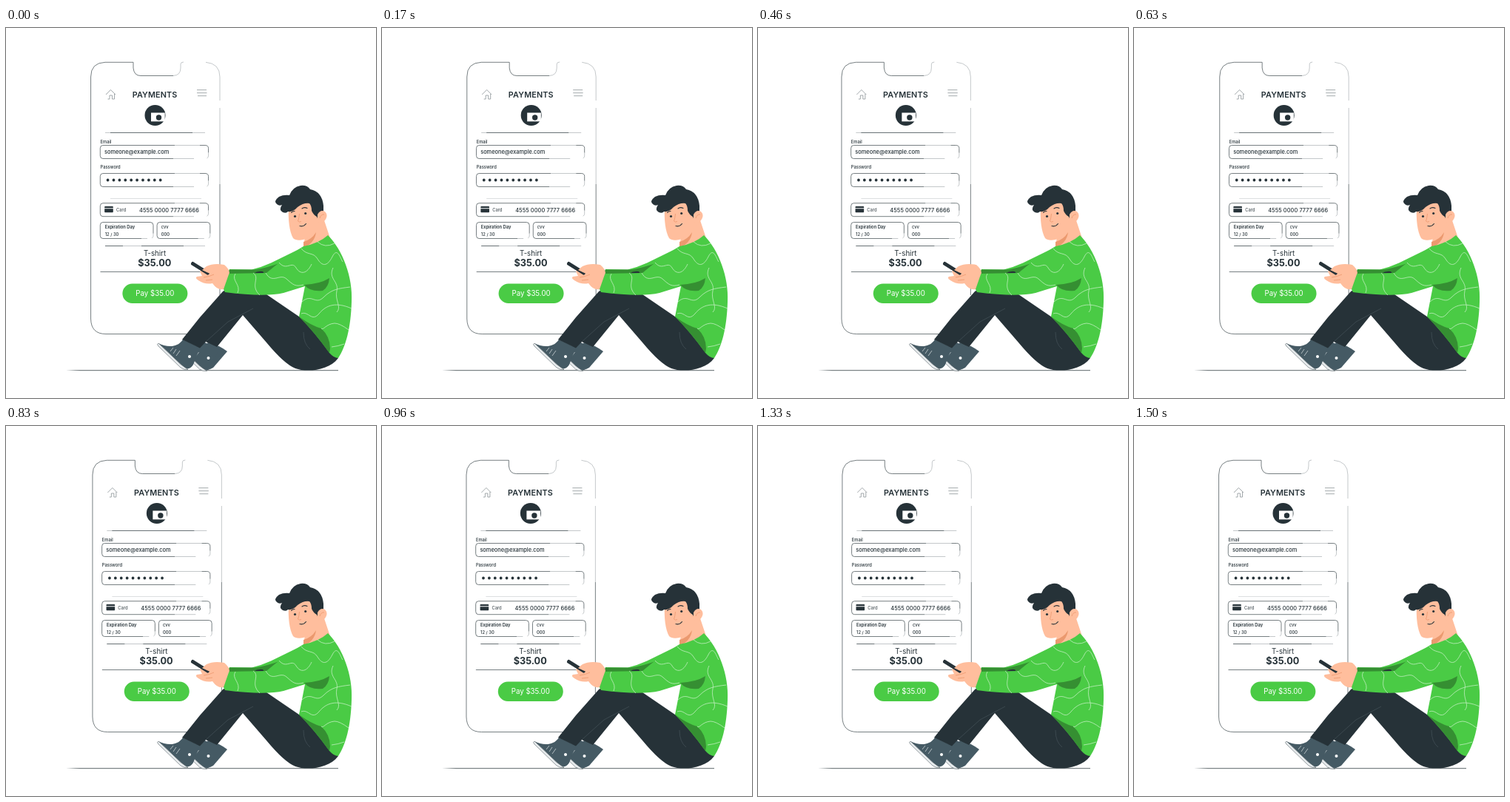
Animation of 500x500 px, one loop 1.54 s. Source, as an HTML page:

```html
<!DOCTYPE html>
<html lang="en">
<head>
<meta charset="utf-8">
<title>Payments</title>
<style>
  html, body { margin: 0; width: 100%; height: 100%; overflow: hidden; background: #fff; }
  svg { display: block; width: 100vw; height: 100vh; }
  text { font-family: Inter, "Open Sans", sans-serif; font-weight: 500; fill: #263238; }
  .small { font-size: 5.8px; }
  .semi { font-weight: 600; }
  .bold { font-weight: 700; }
  .plain { font-weight: 400; }
  .dark { fill: #263238; }
  .green { fill: #4acb45; }
  .shade { fill: #358f32; }
  .skin { fill: #ffbe9d; }
  .fold { fill: none; stroke: #eb996f; stroke-width: .8; }
  .line { fill: none; stroke: #4a5459; stroke-width: .75; }
  .faint { fill: none; stroke: #b0b6b9; stroke-width: .75; }
  .wave { fill: none; stroke: #c9f0c7; stroke-width: .75; }
  .ink { fill: none; stroke: #263238; stroke-width: 1.1; stroke-linecap: round; }
</style>
</head>
<body>
<svg viewBox="0 0 500 500">
  <defs>
    <g id="field">
      <path class="line" d="M228 158.5H131q-3.7 0-3.7 4v10q0 4 3.7 4H226M262 158.5h7q4.5 0 4.5 4v6"/>
      <path class="faint" d="M228 158.5h34M226 176.500h28M273.500 168v5q0 2-2 3"/>
    </g>
    <g id="half">
      <path class="line" d="M183 284.5H131q-3.700 0-3.700-4v-14q0-4 3.700-4h64q4 0 4 4v11"/>
      <path class="faint" d="M183 284.5h8M199 277v4q0 2-2 3"/>
    </g>
    <g id="shoe">
      <path fill="#455a64" d="M206 426C218 432 232 432 239 421L262 432L253 455Q249 462 242 460Z"/>
      <path fill="#e8ecee" stroke="#59656b" stroke-width=".6" d="M206 426Q203 427 206 430L236 459Q240 462 246 461.500Q235 455 225 444Z"/>
      <path fill="none" stroke="#dfe4e6" stroke-width=".7" d="M222 437l4-5M226 440l4-6M230 443l5-7"/>
      <circle cx="248" cy="444" r="2" fill="#fff"/>
    </g>
  </defs>

  <path d="M81 462.400L100 461.900H449V463.200H100Z" fill="#7b8386"/>

  <g id="phone">
    <path class="line" d="M172 46.300H134Q114.600 47 114.600 66V393Q115 413.500 135 413.500H250M172 46.300V54Q173 64.500 182 64.500H226M289 211V361"/>
    <path class="faint" d="M226 64.500Q236 64 236 54V49M236 49Q236 46 240 46M270 46.300Q289 48 289 66V98M289 108V211"/>

    <path d="M135 90l6.500-6.500 6.500 6.500M146.500 89v7h-3v-5h-3.500v5h-2.500M258 83.700h13M258 87.700h13.500M259 91.700h12" fill="none" stroke="#858d91" stroke-width=".75"/>
    <text class="semi" x="170.700" y="93.800" font-size="10.800" letter-spacing=".15">PAYMENTS</text>
    <circle class="dark" cx="201.500" cy="118" r="14"/>
    <path fill="#fff" d="M196 114.500H214.700V126.300H196Z"/>
    <circle class="dark" cx="206.500" cy="121" r="3.700"/>
    <path class="faint" d="M134 141.500H269"/>
    <path class="line" d="M141 141.500H252"/>

    <text class="small" x="127.500" y="155.700">Email</text>
    <use href="#field"/>
    <text x="133" y="170" font-size="7.400">someone@example.com</text>
    <text class="small" x="127.500" y="189.900">Password</text>
    <use href="#field" y="38"/>
    <path d="M137.600 205.500h72" fill="none" stroke="#263238" stroke-width="3.800" stroke-linecap="round" stroke-dasharray="0 7.900"/>

    <path class="faint" d="M141 230.500H264" opacity=".6"/>
    <use href="#field" y="78.200"/>
    <path class="dark" d="M134 241h10q.8 0 .8.800v1.400h-11.600v-1.400q0-.8.8-.8M133.200 244.200h11.600v4.200q0 .8-.8.800h-10q-.8 0-.8-.8z"/>
    <text class="small" x="149" y="248" opacity=".8">Card</text>
    <text x="180" y="248.700" font-size="7.400" letter-spacing=".1">4555 0000 7777 6666</text>

    <use href="#half"/>
    <use href="#half" x="76.800"/>
    <text class="small semi" x="133.700" y="271.300">Expiration Day</text>
    <text class="small" x="133.700" y="280.800">12 / 30</text>
    <text class="small" x="209.700" y="271.300">cvv</text>
    <text class="small" x="209.700" y="280.800">000</text>

    <path class="faint" d="M134 294.500H269"/>
    <path class="line" d="M134 294.500H158M183 294.500H240M127.500 329.500H266"/>
    <text class="plain" x="201" y="308.300" font-size="9.700" text-anchor="middle">T-shirt</text>
    <text class="bold" x="200.800" y="322.200" font-size="12.700" text-anchor="middle">$35.00</text>
    <rect class="green" x="157.400" y="345.500" width="88" height="26.500" rx="13.250"/>
    <text class="plain" x="201.400" y="362" font-size="9.700" text-anchor="middle" style="fill:#fff">Pay $35.00</text>
  </g>

  <!-- legs and shoes -->
  <path fill="#455a64" d="M273 425Q287 428 299 437L280 459Q274 463 268 461L258 440Z"/>
  <use href="#shoe" x="25.500" y="2"/>
  <use href="#shoe"/>
  <path class="dark" d="M293 356L262 391L238 421L262 432.500L270 424L285 431L320 388L352 425Q376 454 391 460C405 465 436 464 449 446L440 400L396 390L352 360L345 328L334 331Z"/>
  <path d="M334 379L300 397L270 424M402 411Q402 427 411 434" fill="none" stroke="#4b585f" stroke-width=".6"/>

  <!-- far sleeve -->
  <path class="green" d="M302 326L332 326.500Q346 323 358 317.500L404 295L390 330L300 333Z"/>
  <path class="shade" d="M302 326.500H338Q356 323 369 318L358 332L299 333Z"/>
  <path class="dark" d="M334 332Q340 328 347 329L350 333Z"/>

  <!-- neck and torso -->
  <path class="skin" d="M404 280L402 300L438 284L430 260L415 258Z"/>
  <path fill="#eb996f" d="M402 289Q413 286 419 276Q417 291 402 297Z"/>
  <path class="green" d="M402 295Q423 291 435 280C455 300 469 337 467 370C466 406 459 431 449 446Q443 446 437 439Q417 411 396 390L404 349L375 358Q350 364 296 357Q291 350 294 341L299 332L352 331Q374 312 402 295Z"/>
  <path class="shade" d="M437 338Q424 346 403 347Q411 357 428 355Q436 350 437 338ZM396 390Q412 402 426 406Q438 417 438 433L437 439Q417 411 396 390Z"/>
  <path class="wave" d="M310 332C304 341 318 347 313 358M334 331C344 338 329 348 343 361M351 331C360 347 370 331 379 339S391 350 402 347M369 317C379 329 386 314 392 324S407 332 413 319M399 298C407 308 415 302 421 312S434 323 441 309S452 312 455 316M421 289Q431 298 444 291M400 370C413 358 418 375 429 364S449 352 465 350M399 386C409 382 413 398 423 386S446 370 467 379M426 406C429 409 432 400 444 399Q451 399 463 408M440 431Q449 430 457 427M442 324C435 339 450 342 447 355S454 377 447 384"/>

  <!-- hand with device -->
  <path class="skin" d="M301 333L294 353Q286 355 279 345Q269 347 260 341Q255 338 258 336L265 335L262 329L271 322Q281 317 295 320Q302 326 302 331Z"/>
  <path d="M252.500 318.500L272.500 331" stroke="#263238" stroke-width="5" stroke-linecap="round"/>
  <path class="skin" d="M265 327Q271 322 282 323L278 333Q271 330 265 327Z"/>
  <path class="fold" d="M267 337Q275 336 281 333M270 341L279 340"/>

  <!-- head -->
  <path class="skin" d="M382 243C381 258 383 276 388 284C394 290 410 286 418 275L428 262L423 236Q403 231 382 243Z"/>
  <path class="dark" d="M381 248Q388 249 394 242Q402 236 410 237Q413 240 413 247Q415 252 420 255L423 262Q430 255 429 240Q427 221 411 218Q407 212 398 213Q387 215 383 226Q375 225 369 228Q361 234 366 238Q369 241 373 239Q368 246 374 249Q379 251 381 248Z"/>
  <path class="skin" d="M421 252Q425 245 431 248Q436 253 431 260Q427 265 421 262Z"/>
  <path class="fold" d="M424 257Q426 251 430 252M396.500 251Q396 257 394.500 261Q396 263 399 261.500"/>
  <circle class="dark" cx="390.500" cy="254.500" r="1.600"/>
  <circle class="dark" cx="404.700" cy="250.500" r="1.600"/>
  <path class="ink" d="M385.500 249.500Q387 247.500 390 247.500M400 244Q403 241.500 407 243.500M397 267.500Q402 269 405.500 264.500"/>
</svg>
<script>
  const LOOP = 1540, STEP = 1000 / 24, SHAKE = 1500, LEAD = 32;
  // Horizontal shake: one stop per tenth of the cycle
  const stops = [0, -1, 2, -4, 4, -4, 4, -4, 2, -1, 0];
  const phone = document.getElementById("phone");

  function shakeAt(ms) {
    const p = (ms % SHAKE) / SHAKE * 10, i = Math.floor(p);
    return stops[i] + (stops[i + 1] - stops[i]) * (p - i);
  }

  const start = performance.now();
  function draw() {
    const t = (performance.now() - start) % LOOP;
    const step = Math.min(36, Math.floor((t + 5) / STEP));
    const x = shakeAt(step * STEP + LEAD) + .2;
    phone.setAttribute("transform", `translate(${x.toFixed(3)} 0)`);
    requestAnimationFrame(draw);
  }
  draw();
</script>
</body>
</html>
```
